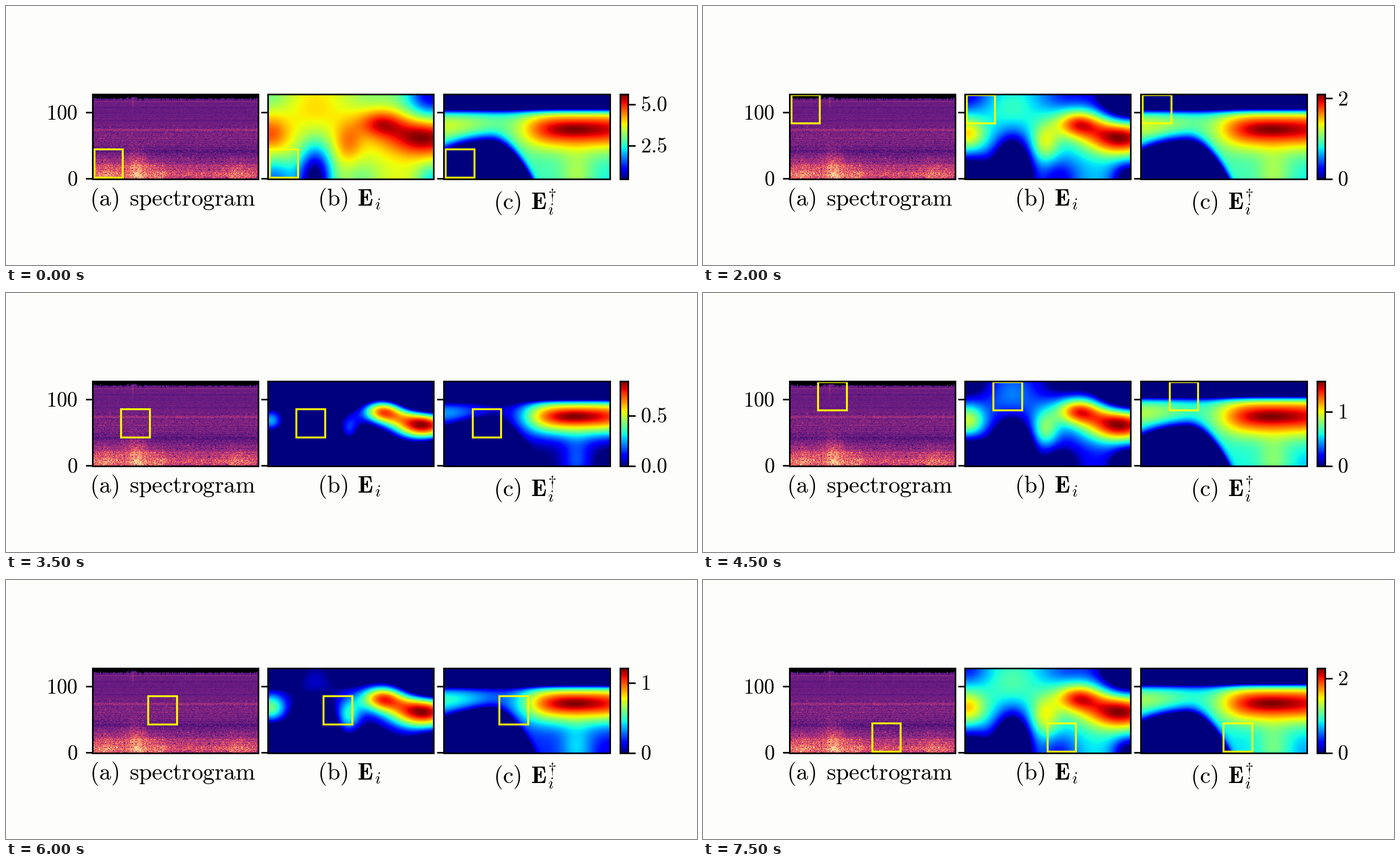
Write a matplotlib script that moves like this. It is 1222 px wide and 458 px high and loops after 8 s.

```python
import numpy as np
import matplotlib.pyplot as plt
from matplotlib.animation import FuncAnimation
from matplotlib.patches import Rectangle
from matplotlib.ticker import MaxNLocator

plt.rcParams["mathtext.fontset"] = "cm"

W, H, DPI = 1222, 458, 256
PT = 72 / DPI                      # points per pixel
TOP, BOTTOM = 156, 306
LEFTS, WIDTH = (153, 463.1, 774.4), 293.3
BAR = (1086, 1100.3)
BINS, STEPS = 128, 250             # frequency bins, time steps
LABEL, TICK, SMALL = 41.7, 36.8, 29.2
LINE = 2.8 * PT

# Largest error for each window position, five heights per column
PEAKS = [5.62, 3.67, 2.4, 2.25, 2.1,
         5.3, 2.1, .843, .55, 1.56,
         4.4, 2.1, 1.205, 1.5, 2.1,
         2.27]


def bump(x, centre, width, power=2):
    return np.exp(-np.abs((x - centre) / width)**power)


def sigmoid(x):
    return 1 / (1 + np.exp(-x))


# Panel coordinates in pixels from the top left corner
U = np.linspace(0, WIDTH, STEPS)[None, :]
V = np.linspace(0, BOTTOM - TOP, BINS)[:, None]


def blob(height, u, v, du, dv):
    return height * bump(U, u, du) * bump(V, v, dv)


def plain_shape():
    s = .62 + blob(.28, 200, 52, 40, 24) + blob(.4, 275, 75, 62, 32)
    s += blob(.2, 5, 70, 30, 30) + blob(.16, 142, 85, 25, 35)
    s += blob(.06, 84, 30, 40, 45)
    s -= blob(.66, 84, 150, 30, 60) + blob(.38, 10, 150, 45, 38)
    s -= blob(.55, 290, 0, 48, 45) + blob(.27, 293, 150, 30, 28)
    s -= blob(.13, 0, 0, 40, 30) + blob(.1, 185, 0, 50, 30)
    s -= blob(.13, 165, 150, 35, 35)
    return s + 1 - s.max()


def dagger_shape():
    s = .42 + .5 * bump(U, 245, 105, 4) * bump(V, 62, 34)
    s = s + blob(.07, 231, 62, 45, 12) + blob(.17, 0, 56, 90, 25)
    s += blob(.12, 235, 140, 28, 40) - blob(.05, 293, 150, 28, 30)
    s -= 1.2 * sigmoid((25 - V) / 5)
    side = U - 80
    ridge = 80 + np.where(side < 0, .003, .0125) * side**2
    s -= .8 * sigmoid((V - ridge) / 8)
    return s + 1 - s.max()


def spectrogram():
    rng = np.random.default_rng(4)
    f = np.arange(BINS)[:, None]
    t = np.arange(STEPS)[None, :]
    grain = rng.standard_normal((BINS, STEPS))
    v = .31 + .045 * bump(f, 64, 18) - .035 * bump(f, 42, 7)
    v = v + .018 * rng.standard_normal((BINS, 1))
    v = v + .05 * grain * (1 - .6 * (f > 80))
    v += .11 * bump(f, 73.5, 1.4) + .07 * bump(f, 52, 1) + .1 * bump(f, 116, .8)
    level = (.24 + .13 * bump(t, 22, 26) + .22 * bump(t, 66, 13)
             + .11 * bump(t, 95, 16) + .1 * bump(t, 217, 20))
    level = level * (1 + .07 * rng.standard_normal((1, STEPS)))
    reach = 23 + 9 * bump(t, 62, 22) + 3 * bump(t, 15, 20)
    v += level * (1.2 + .22 * grain) * np.exp(-(f / reach)**2.2)
    v -= .08 * (f < 3)
    v += .16 * bump(t, 60, .8) * bump(f, 115, 8)
    edge = 119.8 + .9 * rng.standard_normal((1, STEPS)) + 3 * bump(t, 61, 4)
    v *= np.clip((edge - f) / 2 + 1, 0, 1)
    return np.clip(v, 0, 1)[::-1]


fig = plt.figure(figsize=(W / DPI, H / DPI), dpi=DPI, facecolor="#fdfdfc")
ax = fig.add_axes([0, 0, 1, 1])
ax.axis("off")


def picture(data, left, right, **kw):
    return ax.imshow(data, extent=(left, right, BOTTOM, TOP),
                     aspect="auto", zorder=1, **kw)


def frame(left, right):
    ax.add_patch(Rectangle((left, TOP), right - left, BOTTOM - TOP, fill=False,
                           ec="black", lw=LINE, zorder=4, joinstyle="miter"))


def segment(x0, x1, y):
    return ax.plot([x0, x1], [y, y], color="black", lw=LINE, zorder=4,
                   solid_capstyle="butt")[0]


def write(x, y, tex, size, ha="left"):
    return ax.text(x, y, f"${tex}$", fontsize=size * PT, ha=ha,
                   va="baseline", color="black")


def roman(s):
    return rf"\mathrm{{{s}}}"


def caption(x, y, letter, symbol_x):
    write(x, y, roman(f"({letter})"), LABEL)
    write(symbol_x, y, r"\mathbf{E}", LABEL)


picture(spectrogram(), LEFTS[0], LEFTS[0] + WIDTH, cmap="magma",
        vmin=0, vmax=1, interpolation="nearest")
shapes = [plain_shape(), dagger_shape()]
maps = [picture(s, x, x + WIDTH, cmap="jet", interpolation="bilinear")
        for s, x in zip(shapes, LEFTS[1:])]
picture(np.linspace(1, 0, 256)[:, None], *BAR, cmap="jet")

boxes = []
for left in LEFTS:
    frame(left, left + WIDTH)
    for y in (188.3, 305.3):
        segment(left - 12.5, left, y)
    box = Rectangle((left, TOP), 50.5, 50.5, fill=False, ec="#ffff00",
                    lw=3.4 * PT, zorder=3, joinstyle="miter")
    boxes.append(ax.add_patch(box))
frame(*BAR)

write(127, 201, roman("100"), TICK, "right")
write(127, 318.3, roman("0"), TICK, "right")
write(148.3, 352.8, roman("(a)"), LABEL)
write(217.6, 352.8, roman("spectrogram"), LABEL)
caption(551, 352.8, "b", 621)
write(651.5, 360, "i", SMALL)
caption(862.5, 359, "c", 927.6)
write(958.5, 369, "i", SMALL)
write(958.5, 341.5, r"\dagger", SMALL)

marks = [segment(BAR[1], BAR[1] + 12.5, BOTTOM) for _ in range(2)]
labels = [write(1122, BOTTOM, "0", TICK) for _ in range(2)]
locator = MaxNLocator(2, steps=[1, 2, 2.5, 5, 10])

ax.set_xlim(0, W)
ax.set_ylim(H, 0)


def set_ticks(lo, hi):
    ticks = [v for v in locator.tick_values(lo, hi) if lo - 1e-9 <= v <= hi]
    digits = 0 if float(ticks[1] - ticks[0]).is_integer() else 1
    for mark, label, v in zip(marks, labels, ticks):
        y = BOTTOM - (BOTTOM - TOP) * (v - lo) / (hi - lo)
        mark.set_ydata([y, y])
        label.set_y(y + 12.4)
        label.set_text(f"${roman(f'{abs(v):.{digits}f}')}$")


def update(i):
    col, half = divmod(i, 5)
    row = half / 2
    hi = PEAKS[i]
    lo = max(0, .4 * (hi - 4.42))
    # The relief grows with the peak; whatever sinks below the range is clipped
    spreads = 3 + .38 * hi, .85 + .76 * hi - .35 * max(row - 1, 0)
    for m, shape, spread in zip(maps, shapes, spreads):
        m.set_data(np.maximum(hi - spread * (1 - shape), lo))
        m.set_clim(lo, hi)
    for left, box in zip(LEFTS, boxes):
        box.set_xy((left + 2.6 + 47.7 * col, 252.6 - 48 * row))
    set_ticks(lo, hi)
    return [*maps, *boxes, *marks, *labels]


anim = FuncAnimation(fig, update, frames=len(PEAKS), interval=500,
                     repeat=True, repeat_delay=0, blit=False)
plt.show()
```
